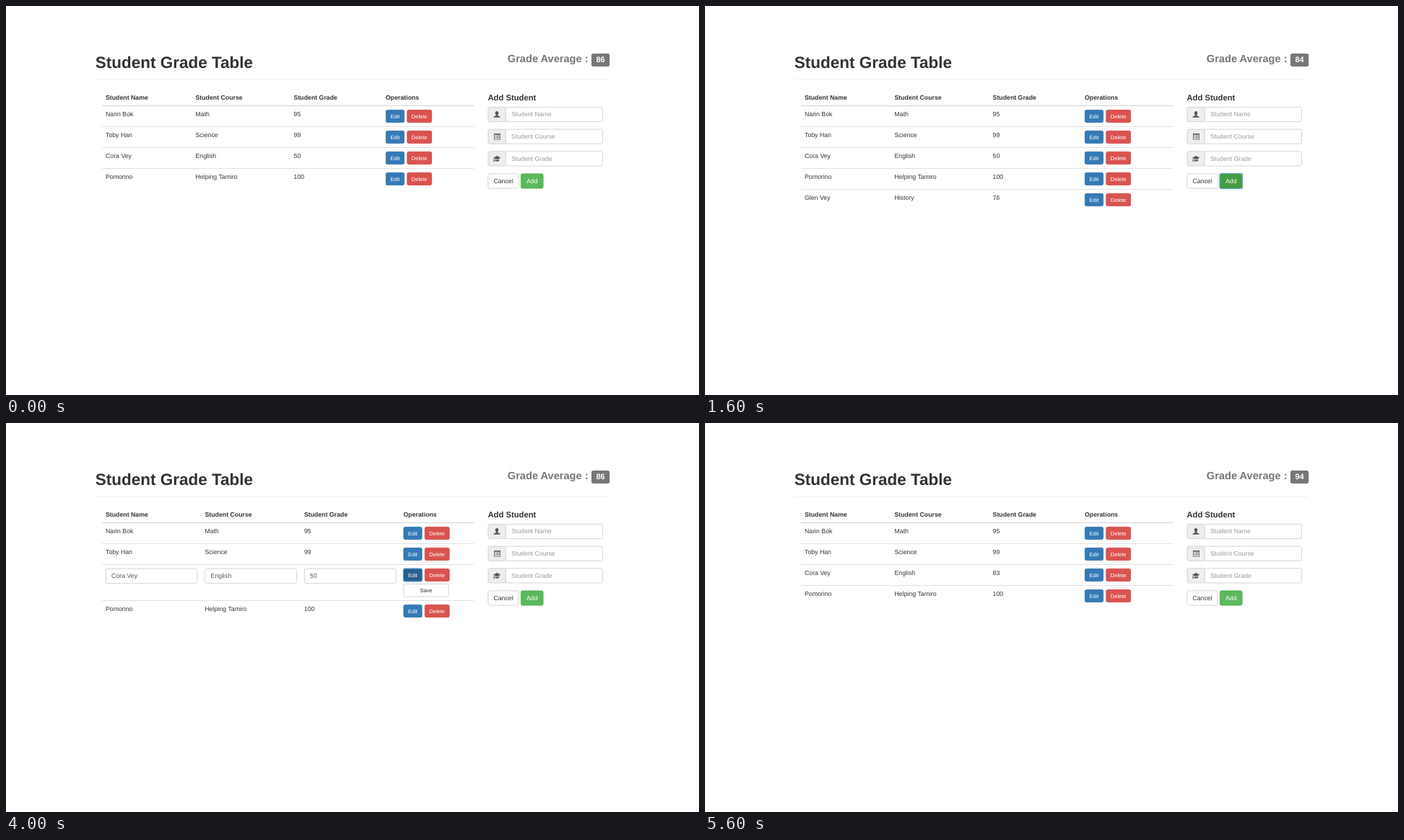
Animation, 960 px wide and 540 px high, one loop 6400 ms. Source, as an HTML page:

```html
<!DOCTYPE html>
<html lang="en">
<head>
<meta charset="utf-8">
<title>Student Grade Table</title>
<style>
  html, body { margin: 0; width: 100%; height: 100%; overflow: hidden; background: #fff; }
  svg { display: block; width: 960px; height: 540px; }
  text { font: 8.75px "Liberation Sans", Arial, Helvetica, sans-serif; fill: #333; text-rendering: geometricPrecision; }
  .bold { font-weight: bold; }
  .mid { text-anchor: middle; }
  .small { font-size: 7.5px; }
  .white { fill: #fff; }
  .value { fill: #555; }
  .hint { fill: #999; }
  .h1 { font-size: 22.5px; font-weight: bold; }
  .sub { font-size: 14.625px; font-weight: bold; fill: #777; text-anchor: end; }
  .badge { font-size: 10.97px; font-weight: bold; fill: #fff; text-anchor: middle; }
  .h4 { font-size: 11.25px; font-weight: bold; }
  .icon { fill: #555; }
  .glow { filter: drop-shadow(0 0 2px rgba(102, 175, 233, .6)); }
  .scene { visibility: hidden; animation: show 6400ms step-end infinite; }
  @keyframes show {
    0% { visibility: visible; }
    12.5%, 100% { visibility: hidden; }
  }
</style>
</head>
<body>
<svg id="stage" viewBox="0 0 960 540" xmlns="http://www.w3.org/2000/svg"></svg>
<script>
const SLOT = 800, LOOP = 6400;
const ROW = 29, TOP = 138;
const STYLES = {
  edit: ['#337ab7', '#2e6da4', '#286090'],
  delete: ['#d9534f', '#d43f3a', '#c9302c'],
  add: ['#5cb85c', '#4cae4c', '#449d44'],
  plain: ['#fff', '#ccc', '#e6e6e6']
};
const HEADS = ['Student Name', 'Student Course', 'Student Grade', 'Operations'];
const VIEW_COLS = [138, 262.5, 398.6, 526];
const EDIT_COLS = [138, 275.5, 413, 550.5];

const text = (x, y, s, cls = '') => `<text x="${x}" y="${y}" class="${cls}">${s}</text>`;

const box = (x, y, w, h, fill, stroke, r = 2, cls = '') =>
  `<rect x="${x + .4}" y="${y + .4}" width="${w - .8}" height="${h - .8}" rx="${r}" fill="${fill}" stroke="${stroke}" stroke-width=".8" class="${cls}"/>`;

const line = (x, y, w, color) => `<rect x="${x}" y="${y}" width="${w}" height="1" fill="${color}"/>`;

function button(x, y, w, h, label, kind, focused) {
  const [fill, edge, active] = STYLES[kind];
  const cls = 'mid' + (h < 20 ? ' small' : '') + (kind === 'plain' ? '' : ' white');
  const ring = focused
    ? `<rect x="${x - .1}" y="${y - .1}" width="${w + .2}" height="${h + .2}" rx="1.8" fill="none" stroke="#5e9ed6"/>` : '';
  return box(x, y, w, h, focused ? active : fill, edge) + ring +
    text(x + w / 2, y + h / 2 + (h < 20 ? 2.6 : 3.1), label, cls);
}

function field(x, y, w, value, focused, cls = 'value') {
  const caret = focused
    ? `<rect x="${x + 8.1 + value.length * 4.87}" y="${y + 5.5}" width=".7" height="10" fill="#333"/>` : '';
  return box(x, y, w, 21, '#fff', focused ? '#66afe9' : '#ccc', 2.4, focused ? 'glow' : '') +
    text(x + 8.1, y + 13.4, value, cls) + caret;
}

function row(y, cells, cols, focus) {
  const x = cols[3];
  return cells.map((c, i) => text(cols[i], y + 15, c)).join('') +
    button(x, y + 6, 26, 18, 'Edit', 'edit', focus === 'edit') +
    button(x + 29.4, y + 6, 34.6, 18, 'Delete', 'delete', focus === 'delete');
}

function editRow(y, cells, cols, focus) {
  return cells.map((c, i) => field(cols[i], y + 6, 127.5, c, focus === i)).join('') +
    row(y, [], cols, focus) +
    button(cols[3], y + 27, 63, 18.5, 'Save', 'plain');
}

function table({ rows, editing, focus, focusRow }) {
  const cols = editing === undefined ? VIEW_COLS : EDIT_COLS;
  let out = HEADS.map((h, i) => text(cols[i], 129.5, h, 'bold')).join('');
  let y = TOP;
  rows.forEach((cells, i) => {
    out += line(133, y, 515.5, i ? '#e2e2e2' : '#d4d4d4');
    const make = i === editing ? editRow : row;
    out += make(y, cells, cols, i === focusRow ? focus : null);
    y += i === editing ? 50 : ROW;
  });
  return out;
}

const ICONS = [
  '<path d="M680 146c-1.500 0-2.300 1.100-2.300 2.600 0 1.200.5 2.100 1.200 2.700v.7l-2.700 1.200q-.9.400-.9 1.600h9.400q0-1.200-.9-1.600l-2.700-1.200v-.7c.7-.6 1.200-1.500 1.200-2.700 0-1.500-.8-2.600-2.300-2.600z"/>',
  '<path fill-rule="evenodd" d="M676 177h9v8.600h-9zM676.800 178.500v6.300h7.400v-6.300z"/><path d="M677.600 179.300h1v.8h-1zm1.800 0h4v.8h-4zm-1.800 1.600h1v.8h-1zm1.800 0h4v.8h-4zm-1.800 1.600h1v.8h-1zm1.800 0h4v.8h-4z"/>',
  '<path d="M675 210.800l5.200-2.700 5.200 2.700-5.200 2.300zM677.600 212.700l2.600 1.200 3-1.300v2.100q-2.800 1.800-5.600.2zM675.700 211.600h.8v2.300l.5 2.200h-1.800l.5-2.200z"/>'
];

function form(values, focus) {
  return HEADS.slice(0, 3).map((hint, i) => {
    const y = 140 + i * 30.7, value = values && values[i];
    return box(667.5, y, 26, 21, '#eee', '#ccc', 2.4) +
      field(691.8, y, 135, value || hint, focus === i, value ? 'value' : 'hint') +
      `<g class="icon">${ICONS[i]}</g>`;
  }).join('') +
    button(667.5, 232.5, 43, 21, 'Cancel', 'plain') +
    button(713, 232.5, 31.5, 21, 'Add', 'add', focus === 'add');
}

const frame =
  text(123.75, 86, 'Student Grade Table', 'h1') +
  text(806.6, 78.2, 'Grade Average :', 'sub') +
  '<rect x="811" y="66" width="25.2" height="18" rx="2.7" fill="#777"/>' +
  line(123.75, 102, 712.5, '#f2f2f2') +
  text(667.5, 131, 'Add Student', 'h4');

const roster = grade => [
  ['Narin Bok', 'Math', '95'],
  ['Toby Han', 'Science', '99'],
  ['Cora Vey', 'English', grade],
  ['Pomorino', 'Helping Tamiro', '100']
];
const base = roster('50');
const added = ['Glen Vey', 'History', '76'];
const grown = [...base, added];

const scenes = [
  { avg: 86, rows: base },
  { avg: 86, rows: base, values: added, formFocus: 2 },
  { avg: 84, rows: grown, formFocus: 'add' },
  { avg: 84, rows: grown, focusRow: 4, focus: 'delete' },
  { avg: 86, rows: base },
  { avg: 86, rows: base, editing: 2, focusRow: 2, focus: 'edit' },
  { avg: 86, rows: roster('83'), editing: 2, focusRow: 2, focus: 2 },
  { avg: 94, rows: roster('83') }
];

document.getElementById('stage').innerHTML = frame + scenes.map((s, i) =>
  `<g class="scene" style="animation-delay:${i ? i * SLOT - LOOP : 0}ms">` +
  text(823.6, 78.2, s.avg, 'badge') + table(s) + form(s.values, s.formFocus) + '</g>'
).join('');
</script>
</body>
</html>
```
